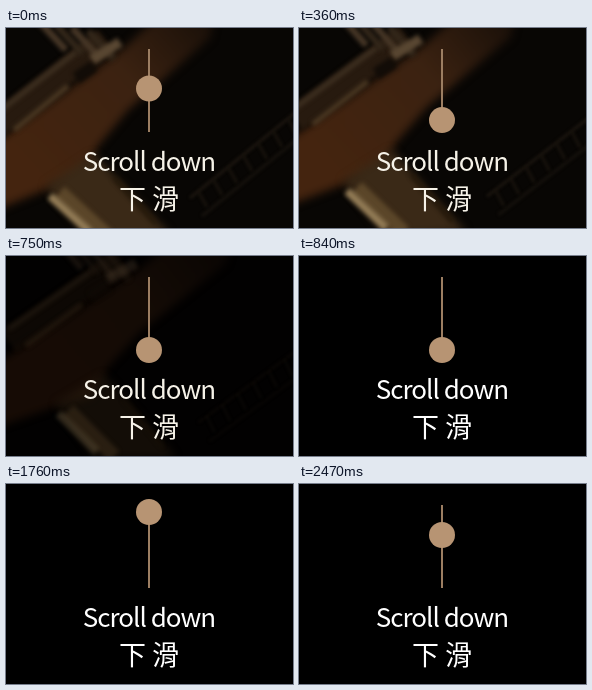
Write an HTML page with a canvas that moves like this. It is 287 px wide and 200 px high and loops after 2550 ms.

```html
<!DOCTYPE html>
<html lang="zh-Hant">
<head>
<meta charset="utf-8">
<style>
  html, body { margin: 0; width: 100%; height: 100%; overflow: hidden; background: #000; }
  canvas { display: block; width: 287px; height: 200px; }
</style>
</head>
<body>
<canvas id="stage" width="287" height="200"></canvas>
<script>
const ctx = document.getElementById('stage').getContext('2d');
const LOOP = 2550;
const TICKS = [0, 70, 150, 220, 290, 360, 440, 520, 600, 670, 750, 840, 900, 980, 1070,
  1140, 1220, 1300, 1380, 1450, 1530, 1600, 1680, 1760, 2150, 2230, 2310, 2390, 2470];
const TOP = 28, BOTTOM = 94, TRAVEL = 940;
const RISE_START = 832, FALL_START = 2084;

const clamp = v => Math.min(1, Math.max(0, v));

// cubic-bezier(.42, 0, .58, 1)
function easeInOut(x) {
  let lo = 0, hi = 1;
  for (let i = 0; i < 24; i++) {
    const s = (lo + hi) / 2;
    const bx = 3 * (1 - s) ** 2 * s * 0.42 + 3 * (1 - s) * s * s * 0.58 + s ** 3;
    if (bx < x) lo = s; else hi = s;
  }
  return lo * lo * (3 - 2 * lo);
}

function ballY(t) {
  const span = BOTTOM - TOP;
  if (t >= RISE_START && t < FALL_START) {
    return BOTTOM - span * easeInOut(clamp((t - RISE_START) / TRAVEL));
  }
  const since = t < RISE_START ? t + LOOP - FALL_START : t - FALL_START;
  return TOP + span * easeInOut(clamp(since / TRAVEL));
}

function stroke(color, width, x1, y1, x2, y2) {
  ctx.strokeStyle = color;
  ctx.lineWidth = width;
  ctx.beginPath();
  ctx.moveTo(x1, y1);
  ctx.lineTo(x2, y2);
  ctx.stroke();
}

function polygon(color, ...points) {
  ctx.fillStyle = color;
  ctx.beginPath();
  for (const [x, y] of points) ctx.lineTo(x, y);
  ctx.fill();
}

// Soft night view, drifting and turning slowly
function drawScene(t) {
  const drift = t / 600;
  ctx.save();
  ctx.fillStyle = '#080604';
  ctx.fillRect(0, 0, 287, 200);
  ctx.translate(125 + 10 * drift, 85 - 5 * drift);
  ctx.rotate(0.04 * drift);
  ctx.translate(-125, -85);

  ctx.filter = 'blur(4px)';
  const ground = ctx.createLinearGradient(30, 150, 200, 0);
  ground.addColorStop(0, '#44240f');
  ground.addColorStop(0.6, '#3b2211');
  ground.addColorStop(1, '#1c1109');
  polygon(ground, [-30, 128], [40, 78], [118, 20], [150, -10], [208, -10], [204, 10],
    [122, 82], [92, 118], [76, 150], [44, 160], [-30, 190]);
  polygon('#3a2917', [40, 158], [88, 126], [164, 206], [84, 212]);

  ctx.filter = 'blur(2px)';
  stroke('#271a0f', 26, -10, 98, 100, 12);
  stroke('#3d2f20', 5, -10, 86, 70, 24);
  stroke('#4c3923', 5, 8, 102, 62, 58);
  for (let i = 0; i < 4; i++) {
    const x = 34 + i * 16, y = -6 + i * 3;
    stroke(i % 2 ? '#33271a' : '#463626', 7, x, y, x + 26, y + 28);
  }
  stroke('#594732', 10, 86, 32, 114, 14);
  stroke('#120c07', 12, 70, 50, 88, 38);

  stroke('#5b4629', 14, 54, 164, 102, 208);
  stroke('#927b55', 8, 44, 168, 84, 204);
  stroke('#241809', 4, 108, 150, 150, 196);

  ctx.filter = 'blur(1.5px)';
  stroke('#1b150f', 3, 184, 170, 300, 76);
  stroke('#15110c', 3, 196, 188, 300, 104);
  for (let i = 0; i < 7; i++) {
    const x = 192 + i * 15, y = 163 - i * 12;
    stroke('#17120c', 3, x, y, x + 9, y + 16);
  }
  ctx.restore();
}

function drawText(text, size, spacing, baseline, color) {
  ctx.font = `300 ${size}px "Noto Sans CJK TC", "Noto Sans CJK SC", "Noto Sans CJK JP", sans-serif`;
  ctx.letterSpacing = spacing;
  ctx.fillStyle = color;
  ctx.textAlign = 'center';
  ctx.fillText(text, 143, baseline);
}

function draw(t) {
  const light = 1 - clamp((t - 600) / 220);
  ctx.fillStyle = '#000';
  ctx.fillRect(0, 0, 287, 200);
  if (light > 0) {
    ctx.globalAlpha = light;
    drawScene(t);
    ctx.globalAlpha = 1;
  }

  ctx.fillStyle = '#9c7e62';
  ctx.fillRect(142, 21, 2, 83);
  ctx.fillStyle = '#b79473';
  ctx.beginPath();
  ctx.arc(143, ballY(t), 13, 0, Math.PI * 2);
  ctx.fill();

  const ink = light > 0 ? '#f6f2e8' : '#fff';
  drawText('Scroll down', 26, '-1px', 142.5, ink);
  drawText('下 滑', 27, '0px', 181, ink);
}

function frame(now) {
  const t = now % LOOP;
  draw(TICKS.findLast(tick => tick <= t));
  requestAnimationFrame(frame);
}
requestAnimationFrame(frame);
</script>
</body>
</html>
```
